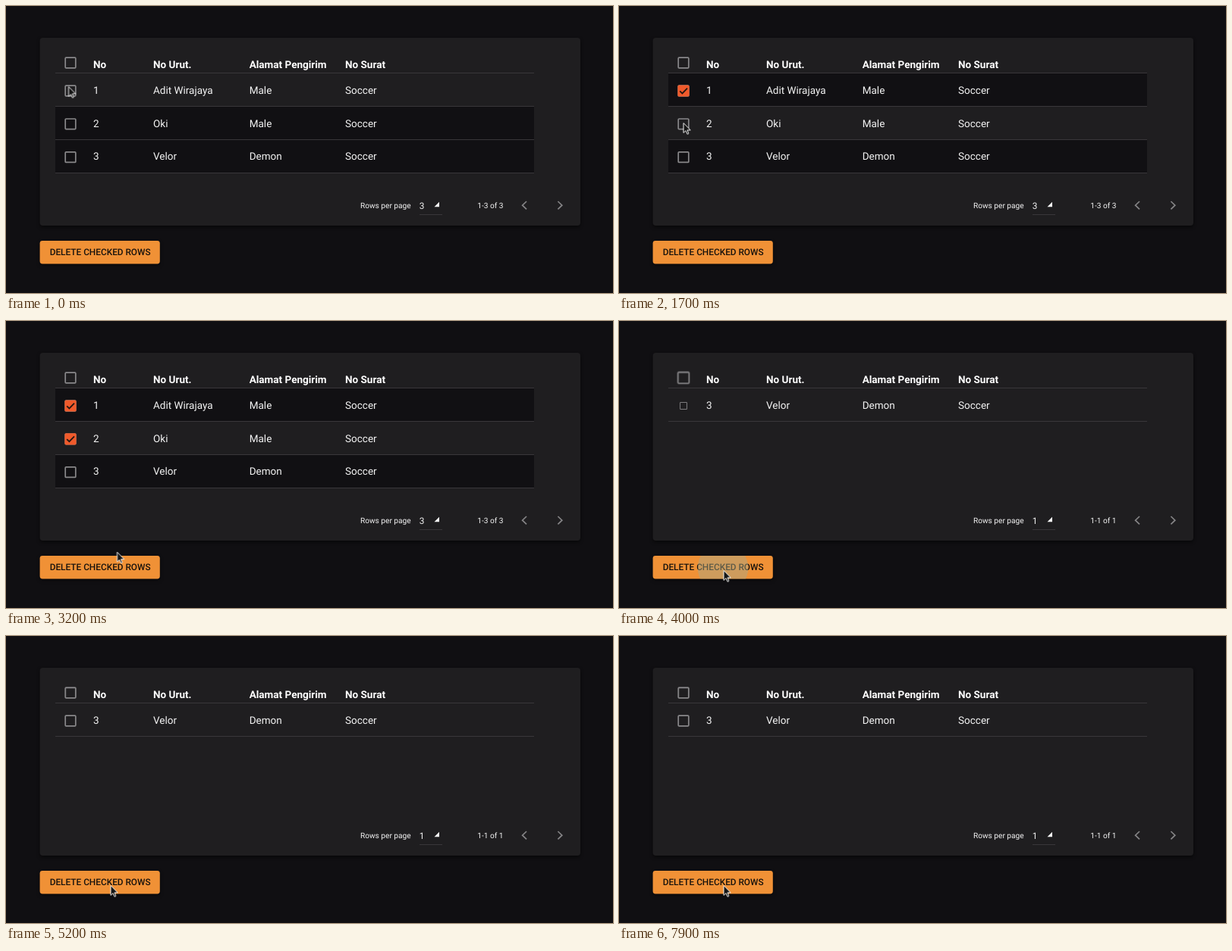
These frames come from a looping animation (800x379 px, 8000 ms). An HTML page:

```html
<!DOCTYPE html>
<html lang="en">
<head>
<meta charset="utf-8">
<title>Table with row deletion</title>
<style>
  html, body { margin: 0; width: 100%; height: 100%; overflow: hidden; background: #100f12; }
  svg { display: block; width: 100%; height: 100%; font: 13.52px Roboto, sans-serif; fill: #f4f4f4; text-rendering: geometricPrecision; }
  .card { fill: #1f1e20; filter: drop-shadow(0 2px 2px rgba(0, 0, 0, .55)); }
  .button { fill: #f09136; filter: drop-shadow(0 2px 2px rgba(0, 0, 0, .5)); }
  .head { font-weight: 700; fill: #fff; }
  .label { font-size: 11.83px; font-weight: 500; fill: #17120d; }
  .small { font-size: 10.14px; }
  .value { font-size: 11.83px; }
  .dark { fill: #111013; }
  .line { stroke: #39373a; }
  .box { fill: none; stroke: #89888a; stroke-width: 1.7; }
  .arrow { fill: none; stroke: #858486; stroke-width: 1.7; }
  .mark { opacity: 0; }
  .ring { fill: #f1602c; opacity: 0; }
  .mark, .ring, .pop { transform-box: fill-box; transform-origin: center; }
</style>
</head>
<body>
<svg id="stage" viewBox="0 0 800 379" preserveAspectRatio="none">
  <defs><clipPath id="clip"><rect x="44.6" y="310" width="158.2" height="30.4" rx="3.4"/></clipPath></defs>
  <rect class="card" x="44.6" y="42" width="712.4" height="248" rx="4"/>
  <g id="table"></g>
  <text class="small" x="467" y="267.2">Rows per page</text>
  <path d="M564.5 265.2H571V258.7Z"/>
  <path class="line" d="M545 275.5H575"/>
  <path class="arrow" d="M686 258L680.6 263.2L686 268.4M727.4 258L732.8 263.2L727.4 268.4"/>
  <rect class="button" x="44.6" y="310" width="158.2" height="30.4" rx="3.4"/>
  <text class="label" x="57.7" y="329.3">DELETE CHECKED ROWS</text>
  <g clip-path="url(#clip)"><circle id="wave" cx="137" cy="326" r="100" fill="#aaaa88" opacity="0"/></g>
  <g id="cursor"><path d="M0 0V13L3 10.2L5 14.7L6.9 13.9L5 9.4H9.2Z" fill="#151515" stroke="#f2f2f2" stroke-width="1"/></g>
</svg>
<script>
const LOOP = 8000;
const CLICKS = [700, 2500];
const DELETED = 3850;
const COLUMNS = [115, 194, 320.7, 447];
const HEAD = ['No', 'No Urut.', 'Alamat Pengirim', 'No Surat'];
const PEOPLE = [
  ['1', 'Adit Wirajaya', 'Male', 'Soccer'],
  ['2', 'Oki', 'Male', 'Soccer'],
  ['3', 'Velor', 'Demon', 'Soccer']
];
const table = document.getElementById('table');

function add(parent, name, attrs, text) {
  const el = document.createElementNS('http://www.w3.org/2000/svg', name);
  for (const key in attrs) el.setAttribute(key, attrs[key]);
  if (text) el.textContent = text;
  return parent.appendChild(el);
}

// steps: [time, value, easing to the next step]
function play(el, prop, steps) {
  const all = [[0, steps[0][1]], ...steps, [LOOP, steps[steps.length - 1][1]]];
  el.animate(all.map(([time, value, easing = 'linear']) => ({ offset: time / LOOP, [prop]: value, easing })),
    { duration: LOOP, iterations: Infinity });
}

const flip = (el, time, from, to) => play(el, 'opacity', [[time, from], [time, to]]);

function cells(parent, values, y, cls = '') {
  values.forEach((value, i) => add(parent, 'text', { x: COLUMNS[i], y, class: cls }, value));
}

function box(parent, y) {
  return add(parent, 'rect', { x: 78.2, y: y - 6.8, width: 13.6, height: 13.6, rx: 1, class: 'box pop' });
}

function line(parent, y) {
  add(parent, 'path', { d: `M65 ${y}H696`, class: 'line' });
}

function checkRow(parent, y, click) {
  const ring = add(parent, 'circle', { cx: 85, cy: y, r: 18, class: 'ring' });
  play(ring, 'opacity', [[click, 0], [click + 80, .2], [click + 280, .2], [click + 550, 0]]);
  play(ring, 'transform', [[click, 'scale(.5)', 'ease-out'], [click + 225, 'scale(1)']]);
  const mark = add(parent, 'g', { class: 'mark' });
  add(mark, 'rect', { x: 77.4, y: y - 7.6, width: 15.2, height: 15.2, rx: 1.7, fill: '#f05a2b' });
  add(mark, 'path', { d: `M80.2 ${y + .3}L83.4 ${y + 3.4}L90 ${y - 3.4}`, fill: 'none', stroke: '#241712', 'stroke-width': 1.8 });
  play(mark, 'opacity', [[click + 40, 0], [click + 130, 1]]);
}

const headBox = box(table, 75);
play(headBox, 'transform', [[DELETED, 'scale(1)'], [4000, 'scale(1.07)'], [4200, 'scale(1)']]);
cells(table, HEAD, 81.5, 'head');

const full = add(table, 'g', {});
const single = add(table, 'g', { opacity: 0 });
flip(full, DELETED, 1, 0);
flip(single, DELETED, 0, 1);

PEOPLE.forEach((person, i) => {
  const top = 89 + 44 * i;
  const mid = 112 + 43.8 * i;
  const back = add(full, 'rect', { x: 65, y: top, width: 631, height: 43.5, class: 'dark' });
  if (i === 0) flip(back, 1350, 0, 1);
  if (i === 1) flip(back, 1450, 1, 0);
  line(full, top + 43.5);
  box(full, mid);
  if (i < 2) checkRow(full, mid, CLICKS[i]);
  cells(full, person, 115.7 + 43.8 * i);
});
add(full, 'text', { x: 544.7, y: 267.8, class: 'value' }, '3');
add(full, 'text', { x: 621.3, y: 267.2, class: 'small' }, '1-3 of 3');

line(single, 132.5);
const fresh = box(single, 112);
play(fresh, 'transform', [[DELETED, 'scale(.3)'], [4000, 'scale(.65)'], [4200, 'scale(1)']]);
cells(single, PEOPLE[2], 115.7);
add(single, 'text', { x: 544.7, y: 267.8, class: 'value' }, '1');
add(single, 'text', { x: 621.3, y: 267.2, class: 'small' }, '1-1 of 1');
line(table, 88.5);

const wave = document.getElementById('wave');
wave.style.transformOrigin = '137px 326px';
play(wave, 'transform', [[3800, 'scale(.1)'], [4000, 'scale(.33)'], [4250, 'scale(1)']]);
play(wave, 'opacity', [[3800, 0], [3880, .48], [4150, .48], [4400, .22], [4800, 0]]);

const at = (x, y) => `translate(${x}px, ${y}px)`;
play(document.getElementById('cursor'), 'transform', [
  [1150, at(82.5, 106.5), 'ease-in-out'],
  [1600, at(85, 154.5)],
  [2800, at(85, 154.5), 'ease-in-out'],
  [3200, at(146.5, 305), 'ease-out'],
  [3500, at(138, 329.5)]
]);
</script>
</body>
</html>
```
